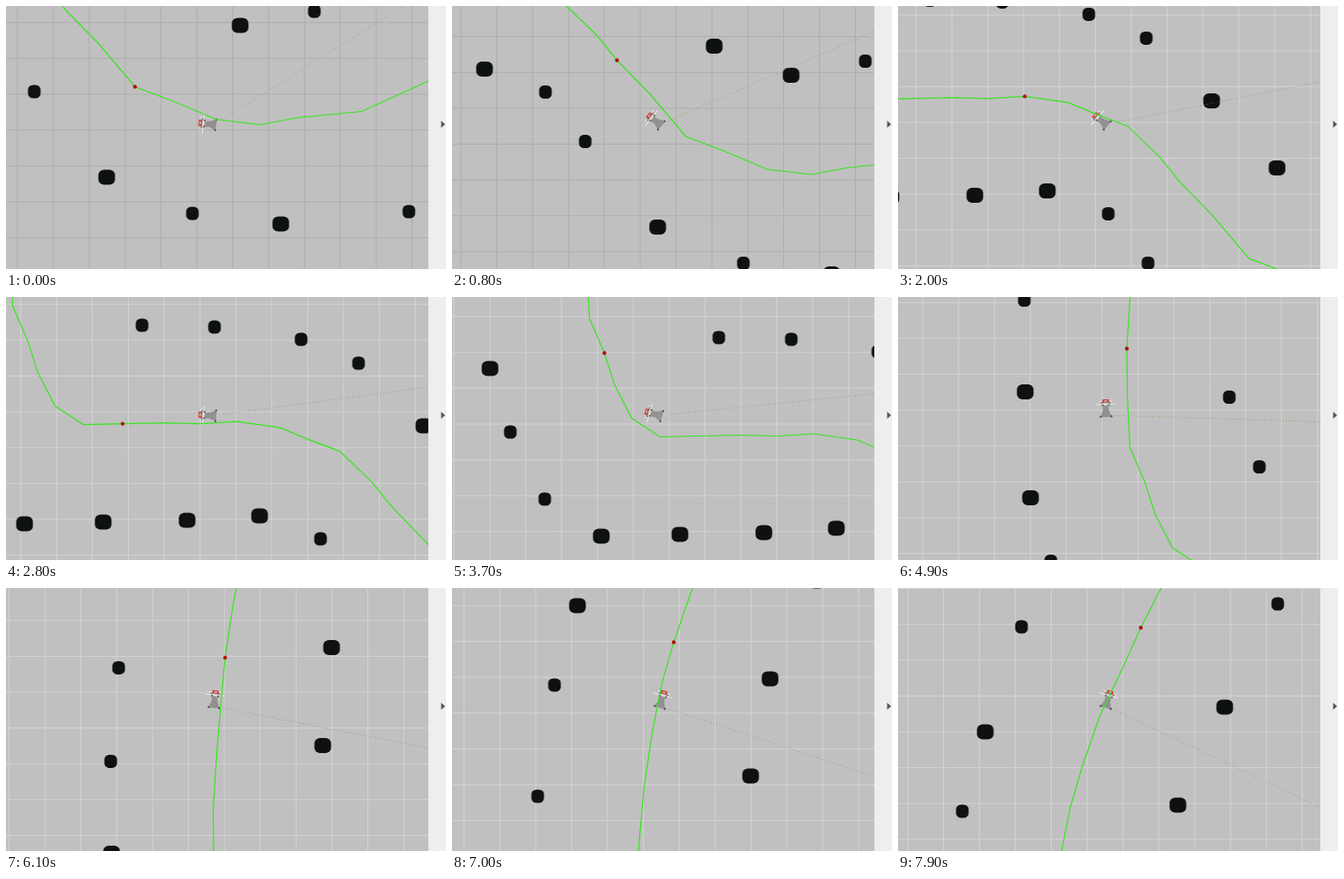
An HTML page with a canvas that plays this animation: 498x298 px, repeating every 8000 ms.

```html
<!DOCTYPE html>
<html>
<head>
<meta charset="utf-8">
<style>
html, body { margin: 0; width: 100%; height: 100%; overflow: hidden; background: #c0c0c0; }
canvas { display: block; }
</style>
</head>
<body>
<canvas id="stage" width="498" height="298"></canvas>
<script>
const ctx = document.getElementById('stage').getContext('2d');
const W = 478, H = 298, LOOP = 8000, CELL = 40.6, LOOKAHEAD = 106, SPEED = 165;
const BASE = { x: 236, y: 134 };      // the robot's fixed place on screen
const ORIGIN = { x: 806, y: -223 };   // far end of the frame link

// Key poses: time in s, world shift, heading in degrees from straight up
const POSES = [
  [0, 0, 0, -83],
  [0.8, 118.8, 56.5, -51],
  [2, 251, 194.4, -50],
  [3.7, 517, 247, -74],
  [4.9, 624, 393.5, -2],
  [6.1, 599.5, 586.4, 6],
  [7.9, 525.8, 875, 16]
].map(([t, x, y, deg]) => {
  const a = deg * Math.PI / 180;
  return { t, x, y, vx: -SPEED * Math.sin(a), vy: SPEED * Math.cos(a) };
});

// Rocks lining the course on both sides; a trailing 1 marks a wide one
const LEFT = [
  [456, 233], [311, 247, 1], [211, 235], [114, 194, 1], [32, 97], [-13, 41], [-82, 15, 1],
  [-164, 20, 1], [-259, 22, 1], [-348, 24, 1], [-412, -18], [-451, -94], [-474, -166, 1],
  [-480, -286, 1], [-481, -390], [-472, -496], [-453, -622], [-427, -712, 1],
  [-386, -831], [-346, -920]
];
const RIGHT = [
  [548, -85], [349, 6], [265, 22, 1], [178, -11, 1], [104, -87, 1], [30, -158], [-35, -185],
  [-133, -199], [-215, -201], [-249, -280], [-241, -408, 1], [-231, -519, 1],
  [-209, -629, 1], [-156, -740, 1], [-96, -857]
];
const ROCKS = [...LEFT, ...RIGHT];
const PATH = planPath();

// Zigzag between the sides by the shorter gap, joining the middles of the gaps
function planPath() {
  const gap = (i, j) => i < LEFT.length && j < RIGHT.length
    ? Math.hypot(LEFT[i][0] - RIGHT[j][0], LEFT[i][1] - RIGHT[j][1]) : Infinity;
  const path = [];
  for (let i = 0, j = 0; gap(i, j) < Infinity;) {
    path.push([(LEFT[i][0] + RIGHT[j][0]) / 2, (LEFT[i][1] + RIGHT[j][1]) / 2]);
    if (gap(i + 1, j) < gap(i, j + 1)) i++;
    else j++;
  }
  return path;
}

// Cubic Hermite value and slope
function hermite(p, q, m, n, u) {
  const a = 2 * p - 2 * q + m + n, b = 3 * q - 3 * p - 2 * m - n;
  return [((a * u + b) * u + m) * u + p, (3 * a * u + 2 * b) * u + m];
}

function poseAt(t) {
  let i = 0;
  while (i < POSES.length - 2 && t >= POSES[i + 1].t) i++;
  const a = POSES[i], b = POSES[i + 1], dt = b.t - a.t, u = (t - a.t) / dt;
  const [x, vx] = hermite(a.x, b.x, a.vx * dt, b.vx * dt, u);
  const [y, vy] = hermite(a.y, b.y, a.vy * dt, b.vy * dt, u);
  return { x, y, angle: Math.atan2(-vx, vy) };
}

function rect(color, x, y, w, h) {
  ctx.fillStyle = color;
  ctx.fillRect(x, y, w, h);
}

function fillPoly(color, points) {
  ctx.fillStyle = color;
  trace(points);
  ctx.fill();
}

function trace(points) {
  ctx.beginPath();
  for (const [x, y] of points) ctx.lineTo(x, y);
}

function drawGrid(pose, color) {
  const start = v => v % CELL;
  for (let x = start(12.5 + pose.x); x < W; x += CELL) rect(color, x, 0, 1, H);
  for (let y = start(18.3 + pose.y); y < H; y += CELL) rect(color, 0, y, W, 1);
}

function blob(color, x, y, rx, ry) {
  ctx.fillStyle = color;
  ctx.beginPath();
  ctx.roundRect(x - rx, y - ry, 2 * rx, 2 * ry, ry * 0.7);
  ctx.fill();
}

function drawRock([rockX, rockY, wide], pose) {
  const x = rockX + pose.x, y = rockY + pose.y;
  const rx = wide ? 9.8 : 7.5, ry = wide ? 8.5 : 7.5;
  blob('#5c6866', x, y, rx, ry - 0.5);
  blob('#0e1011', x, y, rx - 0.8, ry);
}

function drawLink(pose) {
  const dx = ORIGIN.x + pose.x - BASE.x, dy = ORIGIN.y + pose.y - BASE.y;
  const d = Math.hypot(dx, dy);
  ctx.strokeStyle = 'rgba(155, 140, 70, 0.6)';
  ctx.lineWidth = 0.8;
  ctx.setLineDash([2, 2, 1, 2]);
  trace([[BASE.x + dx / d * 10, BASE.y + dy / d * 10], [BASE.x + dx, BASE.y + dy]]);
  ctx.stroke();
  ctx.setLineDash([]);
}

function drawRobot(angle) {
  ctx.save();
  ctx.translate(BASE.x, BASE.y);
  ctx.rotate(angle);
  rect('#e6ebe6', -12, -13, 22, 1);
  fillPoly('#929090', [[-4, -11], [2, -11], [3, -5], [6, 2], [-7, 2], [-4, -5]]);
  for (const side of [-1, 1]) {
    ctx.save();
    ctx.translate(-0.5, 0);
    ctx.scale(side, 1);
    rect('#4c4c4c', 5, 0.5, 2, 2);
    rect('#666', 2.5, -12.5, 2, 2);
    rect('#4f7a52', 4, -15, 1.5, 1.5);
    rect('#e6ebe6', 5.5, -16.5, 1.5, 1.5);
    rect('#d42a24', 2, -17, 1.5, 3);
    ctx.restore();
  }
  rect('#d42a24', -4, -18, 7, 1);
  rect('#d42a24', -3, -15.5, 5, 1);
  ctx.restore();
}

// Draws the path and marks its farthest vertex within reach
function drawPath(pose) {
  const points = PATH.map(([x, y]) => [x + pose.x, y + pose.y]);
  ctx.strokeStyle = '#36e61c';
  ctx.lineWidth = 1.2;
  trace(points);
  ctx.stroke();
  const near = points.filter(([x, y]) => Math.hypot(x - BASE.x, y - BASE.y) < LOOKAHEAD);
  const [x, y] = near[near.length - 1];
  ctx.fillStyle = '#b01410';
  ctx.beginPath();
  ctx.arc(x, y, 2.2, 0, 7);
  ctx.fill();
}

function drawPanel() {
  rect('#eeeeee', W, 0, 20, H);
  fillPoly('#555', [[492.5, 130], [497, 134], [492.5, 138]]);
}

function draw(now) {
  const t = Math.floor((now % LOOP) / 100) / 10;
  const pose = poseAt(t);
  rect('#c0c0c0', 0, 0, W, H);
  drawGrid(pose, t < 1.4 ? '#adadad' : '#d3d3d3');
  for (const rock of ROCKS) drawRock(rock, pose);
  drawLink(pose);
  drawRobot(pose.angle);
  drawPath(pose);
  drawPanel();
}

const begin = performance.now();
function tick() {
  draw(performance.now() - begin);
  requestAnimationFrame(tick);
}
tick();
</script>
</body>
</html>
```
